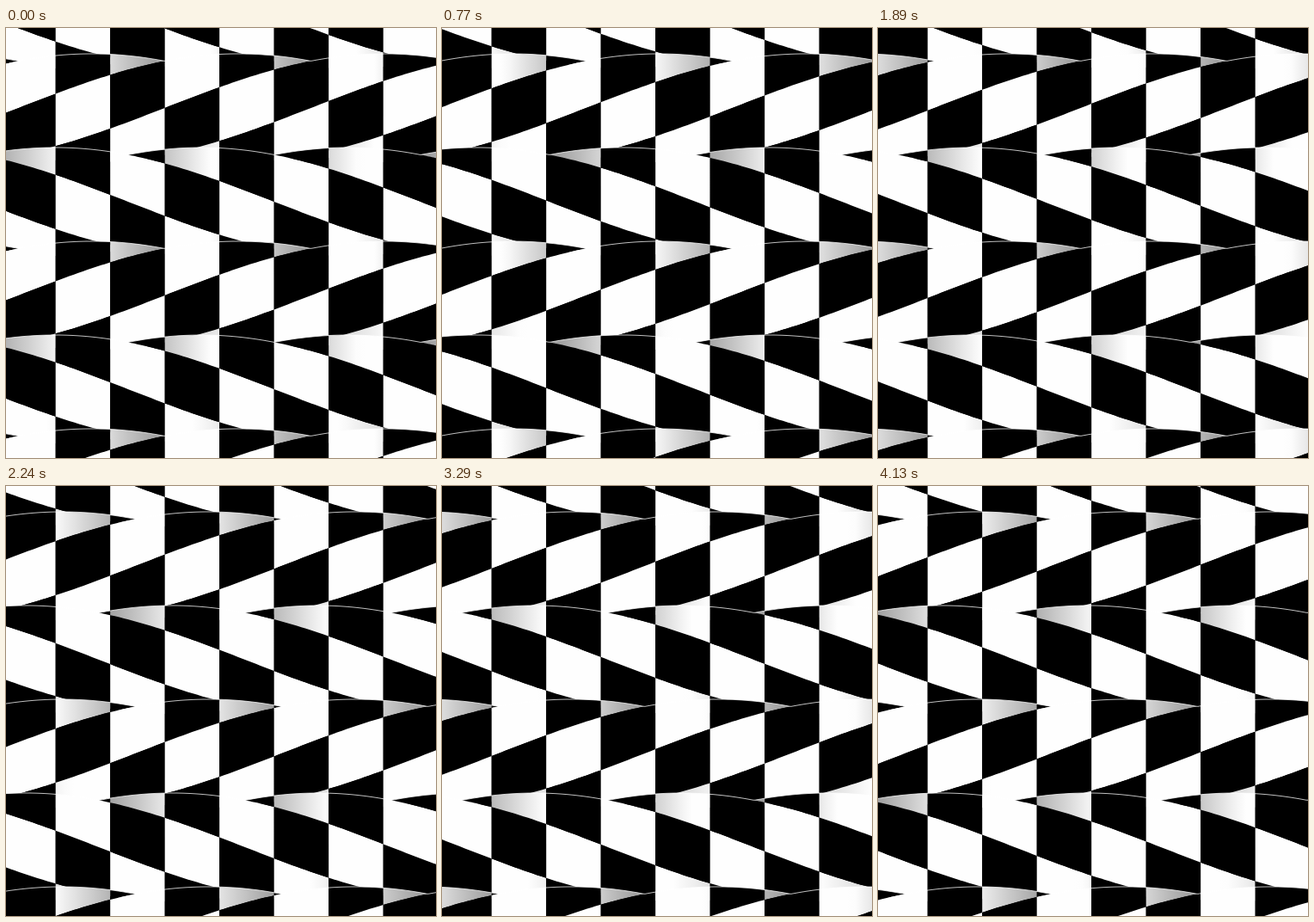
These frames come from a looping animation (500 px wide and 500 px high, 4.2 s). An HTML page with a canvas:

```html
<!DOCTYPE html>
<html lang="en">
<head>
<meta charset="utf-8">
<title>Twisting checkered prisms</title>
<style>
  html, body { margin: 0; width: 100%; height: 100%; overflow: hidden; background: #000; }
  canvas { display: block; width: 500px; height: 500px; }
</style>
</head>
<body>
<canvas id="stage" width="500" height="500"></canvas>
<script>
const ctx = document.getElementById('stage').getContext('2d');

const STEP_MS = 70, STEPS = 20, SHIFT = 17;   // px travelled per step
const RADIUS = 63, PITCH = 109, FIRST_Y = 93; // hexagonal prisms, seen side-on
const BAND = 63.5, BAND_X = -5.8, BANDS = 8;
const FACE = 170;                             // px of length per 60 degree twist
const DEG = Math.PI / 180;

const ramp = (from, to, p) => from + (to - from) * Math.min(1, Math.max(0, p));

// Brightness of a white face; angle 0 and 180 are edge-on at top and bottom.
function shade(angle, row) {
  const top = ramp(148, 254, angle / 34);
  const bottom = ramp(190, 254, (180 - angle) / (row > 2 ? 33 : 26));
  const v = Math.round(Math.min(top, bottom));
  return `rgb(${v},${v},${v})`;
}

// Neighbouring rows twist in opposite directions.
function makeRow(row, step) {
  const odd = row & 1;
  return {
    row,
    dir: odd ? 1 : -1,
    flip: odd,
    y: FIRST_Y + (row - 1) * PITCH,
    tip: (odd ? 184.5 : 142) - step * SHIFT
  };
}

// Angle from the top of the prism edge that meets the skyline at tip.
const edgeAngle = (r, tip, x) => 30 + r.dir * (tip - x) * 60 / FACE;
const height = (r, angle) => r.y - RADIUS * Math.cos(angle * DEG);

function drawFace(r, k, band) {
  const tip = r.tip + k * FACE;
  const far = tip - r.dir * 3 * FACE;
  const left = BAND_X + band * BAND;
  const a = Math.max(left, Math.min(tip, far));
  const b = Math.min(left + BAND, Math.max(tip, far));
  if (b <= a) return;

  const parts = 12;
  const at = i => a + (b - a) * i / parts;
  ctx.beginPath();
  for (let i = 0; i <= parts; i++) {
    ctx.lineTo(at(i), height(r, edgeAngle(r, tip, at(i)) - 60));
  }
  for (let i = parts; i >= 0; i--) {
    ctx.lineTo(at(i), height(r, edgeAngle(r, tip, at(i))));
  }
  if ((band + k + r.flip) & 1) {
    const fill = ctx.createLinearGradient(a, 0, b, 0);
    for (let i = 0; i <= parts; i += 2) {
      fill.addColorStop(i / parts, shade(edgeAngle(r, tip, at(i)) - 30, r.row));
    }
    ctx.fillStyle = fill;
  } else {
    ctx.fillStyle = '#000';
  }
  ctx.fill();
}

function drawSkyline(r) {
  ctx.beginPath();
  for (let x = 0; x <= 500; x += 2) {
    const u = (((x - r.tip) % FACE) + FACE) % FACE / FACE;
    ctx.lineTo(x, height(r, u * 60 - 30));
  }
  ctx.strokeStyle = 'rgba(255,255,255,.75)';
  ctx.lineWidth = 1;
  ctx.stroke();
}

function draw(step) {
  ctx.fillStyle = '#000';
  ctx.fillRect(0, 0, 500, 500);
  for (let row = 0; row <= 5; row++) {
    const r = makeRow(row, step);
    for (let band = 0; band < BANDS; band++) {
      for (let k = -5; k <= 8; k++) drawFace(r, k, band);
    }
    drawSkyline(r);
  }
}

const start = performance.now();
let shown = -1;
function tick() {
  const step = Math.floor((performance.now() - start) / STEP_MS) % STEPS;
  if (step !== shown) draw(shown = step);
  requestAnimationFrame(tick);
}
tick();
</script>
</body>
</html>
```
